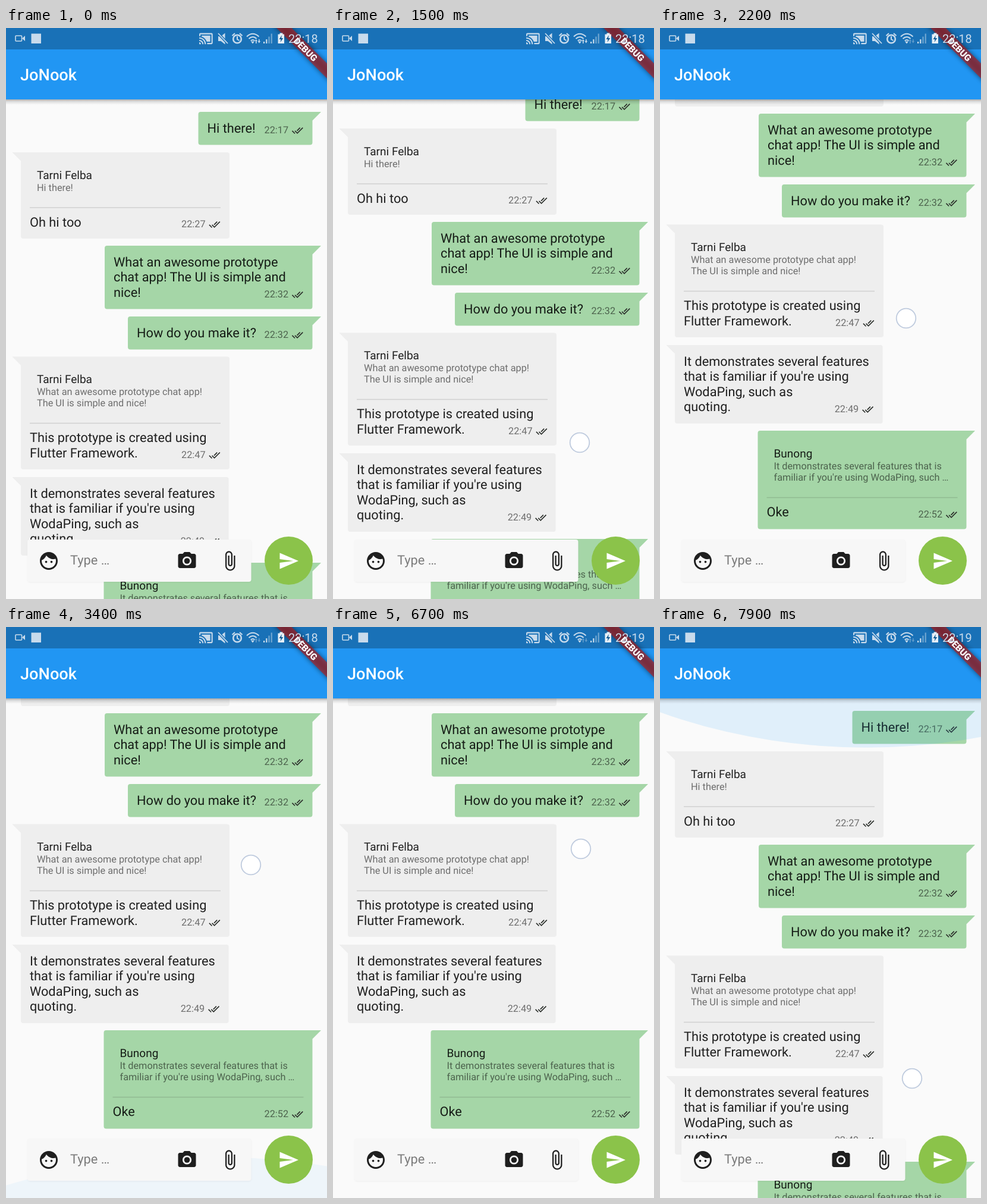
Recreate the animation shown at these times as an HTML page. Size 540 px wide and 960 px high, loop 8 s.

```html
<!DOCTYPE html>
<html lang="en">
<head>
<meta charset="utf-8">
<title>Chat</title>
<style>
html, body { margin: 0; width: 100%; height: 100%; overflow: hidden; background: #fafafa; }
svg { display: block; width: 100vw; height: 100vh; font-family: Roboto, sans-serif; }
text { white-space: pre; text-rendering: geometricPrecision; }
.body { font-size: 21.75px; fill: #000; fill-opacity: .87; }
.name { font-size: 19px; fill: #000; fill-opacity: .87; }
.small { font-size: 16.3px; fill: #000; fill-opacity: .54; }
.hint { font-size: 21.75px; fill: #7b7b7b; }
.title { font-size: 27.2px; font-weight: 500; fill: #fff; }
.clock { font-size: 20px; fill: #c8dbec; }
.debug { font-size: 15.3px; font-weight: 900; fill: #fff; text-anchor: middle; }
</style>
</head>
<body>
<svg viewBox="0 0 540 960">
  <defs>
    <linearGradient id="shade" x2="0" y2="1">
      <stop offset="0" stop-color="#000" stop-opacity=".3"/>
      <stop offset=".4" stop-color="#000" stop-opacity=".12"/>
      <stop offset="1" stop-color="#000" stop-opacity="0"/>
    </linearGradient>
    <filter id="blur" x="-20%" y="-80%" width="140%" height="260%"><feGaussianBlur stdDeviation="4"/></filter>
    <filter id="soft" x="-5%" y="-20%" width="110%" height="140%"><feGaussianBlur stdDeviation="1.5"/></filter>
    <path id="ticks" transform="scale(.82)" d="M18 7l-1.41-1.41-6.34 6.34 1.41 1.41L18 7zm4.24-1.41L11.66 16.17 7.48 12l-1.41 1.41L11.66 19l12-12-1.42-1.41zM.41 13.41L6 19l1.41-1.41L1.83 12 .41 13.41z" fill="#2b2f2b"/>
  </defs>

  <rect width="540" height="960" fill="#fafafa"/>
  <g id="list"></g>
  <ellipse id="glow" rx="810" fill="#2196f3"/>

  <!-- composer -->
  <rect x="36.5" y="861" width="376" height="71" rx="4" fill="#000" opacity=".05" filter="url(#soft)"/>
  <rect x="36" y="860" width="376.5" height="71" rx="4" fill="#f7f7f7"/>
  <g fill="#1f1f1f">
    <path transform="translate(54 878) scale(1.5)" d="M9 11.75c-.69 0-1.25.56-1.25 1.25s.56 1.25 1.25 1.25 1.25-.56 1.25-1.25-.56-1.25-1.25-1.25zm6 0c-.69 0-1.25.56-1.25 1.25s.56 1.25 1.25 1.25 1.25-.56 1.25-1.25-.56-1.25-1.25-1.25zM12 2C6.48 2 2 6.48 2 12s4.48 10 10 10 10-4.48 10-10S17.52 2 12 2zm0 18c-4.41 0-8-3.59-8-8 0-.29.02-.58.05-.86 2.36-1.05 4.23-2.98 5.21-5.37C11.07 8.33 14.05 10 17.42 10c.78 0 1.53-.09 2.25-.26.21.71.33 1.47.33 2.26 0 4.41-3.59 8-8 8z"/>
    <g transform="translate(286.5 878) scale(1.5)">
      <path d="M9 2L7.17 4H4c-1.1 0-2 .9-2 2v12c0 1.1.9 2 2 2h16c1.1 0 2-.9 2-2V6c0-1.1-.9-2-2-2h-3.17L15 2H9zm3 15c-2.76 0-5-2.24-5-5s2.24-5 5-5 5 2.24 5 5-2.24 5-5 5z"/>
      <circle cx="12" cy="12" r="3.2"/>
    </g>
    <path transform="translate(358.5 878) scale(1.5)" d="M16.5 6v11.5c0 2.21-1.79 4-4 4s-4-1.79-4-4V5c0-1.38 1.12-2.5 2.5-2.5s2.5 1.12 2.5 2.5v10.5c0 .55-.45 1-1 1s-1-.45-1-1V6H10v9.5c0 1.38 1.12 2.5 2.5 2.5s2.5-1.12 2.5-2.5V5c0-2.21-1.79-4-4-4S7 2.79 7 5v12.5c0 3.04 2.46 5.5 5.5 5.5s5.5-2.46 5.5-5.5V6h-1.5z"/>
  </g>
  <text class="hint" x="108" y="902">Type …</text>
  <circle cx="475.5" cy="895.5" r="40.5" fill="#8bc34a"/>
  <path transform="translate(457.5 878) scale(1.5)" d="M2.01 21L23 12 2.01 3 2 10l15 2-15 2z" fill="#fff"/>

  <!-- app bar -->
  <rect y="120" width="540" height="9" fill="url(#shade)"/>
  <rect y="36" width="540" height="84" fill="#2196f3"/>
  <rect width="540" height="36" fill="#1971b7"/>
  <text class="title" x="24" y="88">JoNook</text>
  <g transform="translate(540 0) rotate(45)">
    <rect x="-70" y="42" width="140" height="18" fill="#000" opacity=".5" filter="url(#blur)"/>
    <rect x="-70" y="42" width="140" height="18" fill="#b71c1c" opacity=".63"/>
    <text class="debug" x="0" y="56.5">DEBUG</text>
  </g>

  <!-- status bar, above the ribbon -->
  <g fill="#c8dbec">
    <rect x="16" y="13" width="10.5" height="9" rx="1" fill="none" stroke="#c8dbec" stroke-width="1.6"/>
    <path d="M27 17.5l5-4.5v9z"/>
    <rect x="42.5" y="9.5" width="16.5" height="16.5"/>
    <path transform="translate(324 5.5) scale(1.03)" d="M21 3H3c-1.1 0-2 .9-2 2v3h2V5h18v14h-7v2h7c1.1 0 2-.9 2-2V5c0-1.1-.9-2-2-2zM1 18v3h3c0-1.66-1.34-3-3-3zm0-4v2c2.76 0 5 2.24 5 5h2c0-3.87-3.13-7-7-7zm0-4v2c4.97 0 9 4.03 9 9h2c0-6.08-4.93-11-11-11zM19 7H5v1.63c3.96 1.28 7.09 4.41 8.37 8.37H19V7z"/>
    <path d="M357 14h4.5l7-5.5v19l-7-5.5h-4.5z"/>
    <path d="M357 9l16 17" stroke="#1971b7" stroke-width="4.5"/>
    <path d="M357 9l16 17" stroke="#c8dbec" stroke-width="1.8"/>
    <g fill="none" stroke="#c8dbec" stroke-width="2">
      <circle cx="389" cy="18.5" r="6.8" stroke-width="2.6"/>
      <path d="M389 14v5l3.5 2M380.5 13l4.5-4M397.5 13l-4.5-4"/>
      <path d="M405 14.5q10-9.5 20.5 0M408.5 18q7-6 13 0M411.8 21.5q3.5-3 6.5 0"/>
    </g>
    <path d="M412 22.5h6l-3 4z"/>
    <path id="traffic" d="M418.5 22l2.3-3 2.3 3h-1.5v4h-1.6v-4zM423.5 22h1.5v-3h1.6v3h1.5l-2.3 3.5z"/>
    <path d="M433 23h2.2v3h-2.2zM437.2 19h2.2v7h-2.2z"/>
    <path d="M441.4 14.5h2.2v11.5h-2.2zM445.6 9.5h2.2v16.5h-2.2z" opacity=".5"/>
    <path fill="#e6eff7" d="M460.5 8.5h5v2h2.5v15.5h-10.5v-15.5h3z"/>
    <path fill="#155b93" d="M464 12l-4.5 7h3l-1 5 4.8-7h-3.2z"/>
  </g>
  <text id="clock" class="clock" x="475" y="25"></text>

  <circle id="touch" r="16.3" fill="#fff" fill-opacity=".96" stroke="#bfcbde" stroke-width="1.8"/>
</svg>
<script>
const $ = id => document.getElementById(id);
const LOOP = 8000, STEP = 100, END = 222, SLOP = 16, DENSITY = 1.5;
const PERSON = 'Tarni Felba', SELF = 'Bunong';

// Each bubble: left, right, top, bottom, text x, first baseline, lines, time, optional quote.
const bubbles = [
  { mine: true, l: 323.5, r: 515.5, t: 141, b: 196.5, x: 338.5, y: 176, lines: ['Hi there!'], time: '22:17', ty: 177.5 },
  { l: 25, r: 376, t: 209, b: 354, x: 40, y: 334, lines: ['Oh hi too'], time: '22:27', ty: 335.5,
    who: PERSON, quote: ['Hi there!'], rule: 302 },
  { mine: true, l: 166, r: 515.5, t: 366, b: 472.5, x: 181, y: 401,
    lines: ['What an awesome prototype', 'chat app! The UI is simple and', 'nice!'], time: '22:32', ty: 453.5 },
  { mine: true, l: 205, r: 515.5, t: 485, b: 540.5, x: 220, y: 520, lines: ['How do you make it?'], time: '22:32', ty: 521.5 },
  { l: 25, r: 376, t: 552.5, b: 742, x: 40, y: 696.5,
    lines: ['This prototype is created using', 'Flutter Framework.'], time: '22:47', ty: 723.5,
    who: PERSON, quote: ['What an awesome prototype chat app!', 'The UI is simple and nice!'], rule: 664.5 },
  { l: 25, r: 374.7, t: 755, b: 887, x: 40, y: 790,
    lines: ['It demonstrates several features', "that is familiar if you're using", 'WodaPing, such as', 'quoting.'],
    time: '22:49', ty: 868.5 },
  { mine: true, l: 164.5, r: 515.5, t: 899, b: 1064.5, x: 179.5, y: 1043.5, lines: ['Oke'], time: '22:52', ty: 1045.5,
    who: SELF, quote: ['It demonstrates several features that is', "familiar if you're using WodaPing, such …"], rule: 1011.5 }
];

// Baselines sit on whole pixels.
const label = (kind, x, y, s) => `<text class="${kind}" x="${x}" y="${Math.floor(y)}">${s}</text>`;

function bubble(m) {
  const { l, r, t, b } = m, c = 4;
  const top = m.mine
    ? `M${l} ${t + c}q0 ${-c} ${c} ${-c}H${r + 14.5}L${r} ${t + 14.5}`
    : `M${l} ${t + 14.5}L${l - 14.5} ${t}H${r - c}q${c} 0 ${c} ${c}`;
  const shape = `${top}V${b - c}q0 ${c} ${-c} ${c}H${l + c}q${-c} 0 ${-c} ${-c}z`;
  const tx = r - 81;
  let out = `<path d="${shape}" fill="${m.mine ? '#a5d6a7' : '#eee'}"/>`;
  if (m.who) {
    out += label('name', m.x + 12, t + 45, m.who);
    m.quote.forEach((s, i) => out += label('small', m.x + 12, t + 65 + 19.1 * i, s));
    out += `<path d="M${m.x} ${m.rule}H${r - 15}" stroke="#000" stroke-opacity=".13" stroke-width="1.5"/>`;
  }
  m.lines.forEach((s, i) => out += label('body', m.x, m.y + 25.5 * i, s));
  return out + label('small', tx, m.ty, m.time) +
    `<use href="#ticks" x="${tx + 46}" y="${m.ty - 15}"/>`;
}

// Finger paths as [time, x, y]; the finger is down from the first to the last entry.
const dragUp = [[900, 416, 753], [1100, 416, 753], [1300, 416, 735], [1500, 415, 697], [1900, 414, 576],
  [2200, 414, 488], [2700, 413, 465], [2900, 413, 465], [3400, 412, 400]];
const dragDown = [[5600, 417, 373], [6700, 417, 373], [6800, 416, 386], [6900, 415, 407], [7200, 413, 504],
  [7500, 417, 613], [7900, 424, 759], [8000, 424, 780]];

function along(path, t) {
  if (t <= path[0][0]) return path[0].slice(1);
  for (let i = 1; i < path.length; i++) {
    const [a, ax, ay] = path[i - 1], [b, bx, by] = path[i];
    if (t <= b) {
      const k = (t - a) / (b - a);
      return [ax + (bx - ax) * k, ay + (by - ay) * k];
    }
  }
  return path[path.length - 1].slice(1);
}

const isDown = (path, t) => t >= path[0][0] && t <= path[path.length - 1][0];
const clamp = (v, lo, hi) => Math.min(hi, Math.max(lo, v));

// Overscroll arc: grows with the pull and leans towards the finger.
function drawGlow(pull, x, atTop, fade) {
  const size = pull > 0 ? 1 - 1 / (.7 * Math.sqrt(pull / DENSITY / 200 * 72.3)) : 0;
  const s = Math.max(0, size), lift = 701.5 * s, g = $('glow');
  g.setAttribute('cx', 270 * (.5 + x / 540));
  g.setAttribute('cy', atTop ? 120 - lift : 960 + lift);
  g.setAttribute('ry', 810 * s);
  g.setAttribute('opacity', pull > 0 ? .66 * pull / 840 * fade : 0);
}

function render(t) {
  const late = t >= 5000;
  const path = late ? dragDown : dragUp;
  const [x, y] = along(path, t);
  let scroll, pull, fade = 1;
  if (late) {
    const moved = Math.max(0, y - path[0][2] - SLOP);
    scroll = Math.max(0, END - 1 - moved);
    pull = moved - (END - 1);
  } else {
    scroll = clamp(path[0][2] - SLOP - y, 0, t < 2900 ? END : END - 1);
    pull = 465 - y;
    fade = clamp((3800 - t) / 400, 0, 1);
  }
  $('list').setAttribute('transform', `translate(0 ${-Math.round(scroll)})`);
  drawGlow(pull, x, late, fade);
  const touch = $('touch');
  touch.setAttribute('visibility', isDown(path, t) ? 'visible' : 'hidden');
  touch.setAttribute('cx', x);
  touch.setAttribute('cy', y);
  $('clock').textContent = late ? '22:19' : '22:18';
  $('traffic').setAttribute('opacity', t < 2000 ? 1 : .4);
}

$('list').innerHTML = bubbles.map(bubble).join('');
const start = performance.now();
function tick() {
  const t = (performance.now() - start) % LOOP;
  render(Math.floor(t / STEP) * STEP);
  requestAnimationFrame(tick);
}
tick();
</script>
</body>
</html>
```
